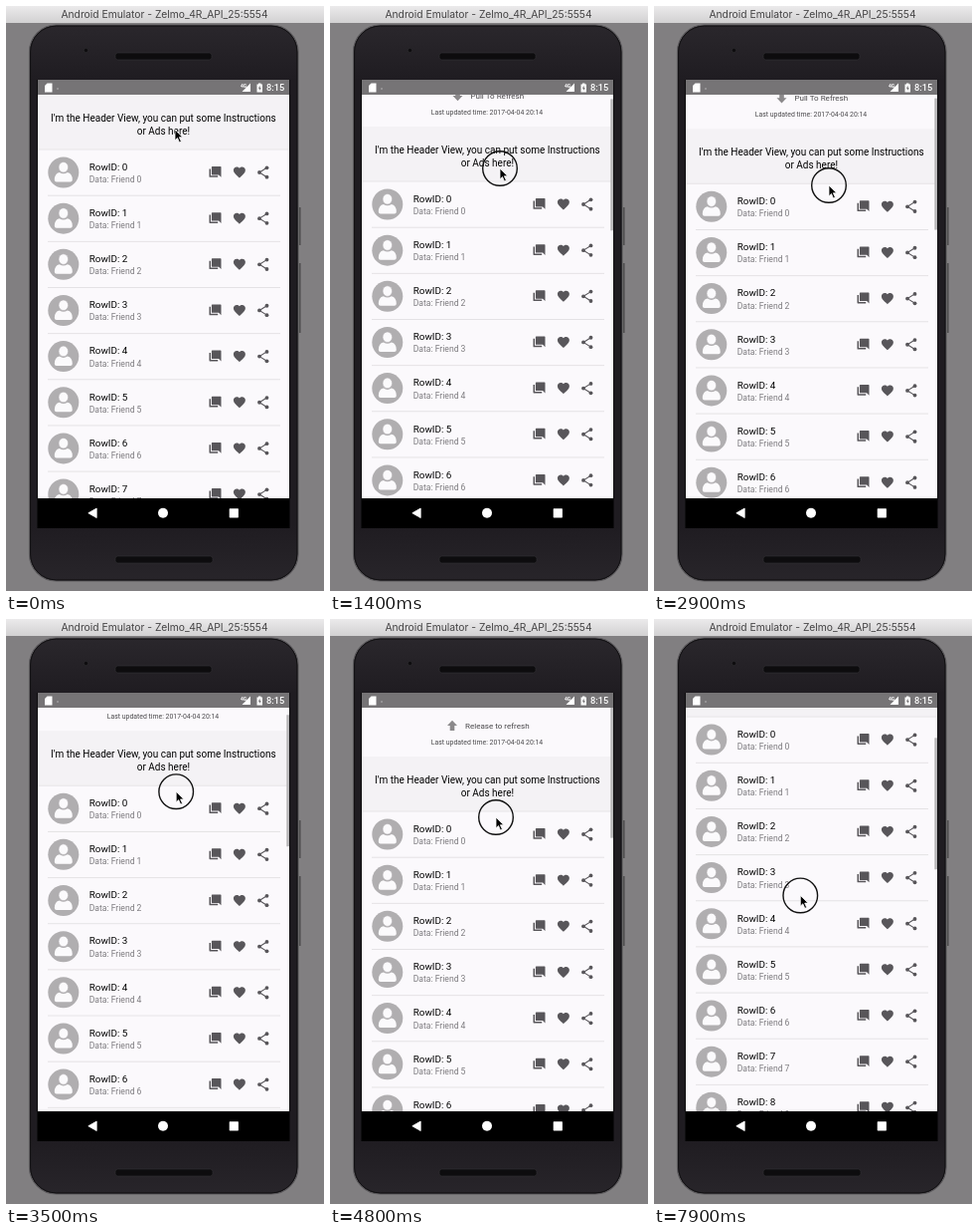
An HTML page that plays this animation: 320x587 px, repeating every 8000 ms.

```html
<!DOCTYPE html>
<html lang="en">
<head>
<meta charset="utf-8">
<title>Pull to refresh</title>
<style>
html, body { margin: 0; width: 100%; height: 100%; overflow: hidden; background: #817f81; }
svg { display: block; width: 320px; height: 587px; font-family: Roboto, "Open Sans", sans-serif; }
.bar { font-family: Inter, "Open Sans", sans-serif; }
</style>
</head>
<body>
<svg viewBox="0 0 320 587" xmlns="http://www.w3.org/2000/svg">
<defs>
  <linearGradient id="title" x2="0" y2="1">
    <stop stop-color="#ebeaeb"/><stop offset="1" stop-color="#d2d1d2"/>
  </linearGradient>
  <linearGradient id="body" x2="0" y2="1">
    <stop stop-color="#2a272c"/><stop offset=".1" stop-color="#1f1c21"/>
    <stop offset=".9" stop-color="#1f1c21"/><stop offset="1" stop-color="#28252a"/>
  </linearGradient>
  <clipPath id="view"><rect x="32" y="89" width="253" height="405"/></clipPath>
  <g id="icons" fill="#58565a">
    <path transform="translate(203.3 159.8) scale(.6)" d="M7 2h14q1 0 1 1v17l-4-4H7q-1 0-1-1V3q0-1 1-1zM2 6h2.500v11.500h12V20H3q-1 0-1-1z"/>
    <path transform="translate(227.7 159.7) scale(.6)" d="M12 21.4l-1.5-1.4C5.4 15.4 2 12.3 2 8.5 2 5.4 4.4 3 7.5 3c1.7 0 3.4.8 4.5 2.1C13.1 3.8 14.8 3 16.5 3 19.6 3 22 5.4 22 8.5c0 3.8-3.4 6.9-8.5 11.5z"/>
    <path d="M262.500 162.300l-7.500 4.700 7.500 4.700" fill="none" stroke="#58565a" stroke-width="1.1"/>
    <circle cx="262.500" cy="162.300" r="1.9"/><circle cx="255" cy="167" r="1.9"/><circle cx="262.500" cy="171.700" r="1.9"/>
  </g>
  <g id="avatar">
    <circle cx="57.8" cy="167" r="15.5" fill="#b0aeb0"/>
    <path d="M48.800 174.500q0-6.500 5-7.500 4 2.600 8 0 5 1 5 7.500 0 2-2 2H50.800q-2 0-2-2z" fill="#fbfafc"/>
    <ellipse cx="57.8" cy="161.800" rx="4.800" ry="5.300" fill="#fbfafc" stroke="#b0aeb0" stroke-width=".6"/>
  </g>
</defs>

<rect width="320" height="587" fill="#817f81"/>
<rect width="320" height="17" fill="url(#title)"/>
<text class="bar" x="159.500" y="12" font-size="10.300" text-anchor="middle" fill="#454445">Android Emulator - Zelmo_4R_API_25:5554</text>

<!-- phone -->
<path d="M295.800 202v38M295.800 258v70" stroke="#4a494b" stroke-width="1.400"/>
<rect x="23.500" y="19" width="270.500" height="558" rx="27" fill="url(#body)" stroke="#5c5a5d" stroke-width="1.200"/>
<rect x="24.600" y="20.100" width="268.300" height="555.800" rx="26" fill="none" stroke="#111012"/>
<g fill="#0d0c0e" stroke="#353337" stroke-width=".6">
  <rect x="110" y="47" width="97" height="7" rx="2.500"/>
  <rect x="110" y="552" width="98" height="7" rx="2.500"/>
  <circle cx="80.500" cy="44.500" r="2.200"/>
</g>
<rect x="31.500" y="74" width="254" height="450" fill="#000"/>
<rect x="32" y="74" width="253" height="15" fill="#767476"/>

<!-- status bar -->
<g fill="#fff">
  <path d="M41.500 77.500h5v9h-7.500v-6.500z"/>
  <circle cx="52" cy="83" r=".8" opacity=".5"/>
  <text x="236" y="82" font-size="5" font-weight="700">4G</text>
  <path d="M246 77.500v8.500h-8.500z"/>
  <path d="M254 77.500h2.500v1h1.500v8h-5.500v-8H254z"/>
  <path d="M255.600 79.800l-1.800 3h1.200v2.200l1.800-3h-1.200z" fill="#767476"/>
  <text x="262" y="85.300" font-size="9.200" font-weight="500">8:15</text>
</g>

<g clip-path="url(#view)">
  <rect x="32" y="89" width="253" height="405" fill="#fbf9fc"/>
  <g id="list">
    <path id="arrow" d="M-2.300-5h4.600V0H5L0 5.200-5 0h2.700z" fill="#8b898b"/>
    <text id="hint" x="168.300" y="61" font-size="8.050" text-anchor="middle" fill="#4a494b"></text>
    <text x="158" y="76.800" font-size="6.900" text-anchor="middle" fill="#4a494b">Last updated time: 2017-04-04 20:14</text>
    <rect x="32" y="89" width="253" height="55" fill="#f4f2f5"/>
    <path d="M32 144h253" stroke="#e2e0e3" stroke-width=".8"/>
    <g font-size="10" text-anchor="middle" fill="#000">
      <text x="158.400" y="116">I'm the Header View, you can put some Instructions</text>
      <text x="158.400" y="129">or Ads here!</text>
    </g>
    <g id="rows"></g>
  </g>
  <rect id="scroll" x="282.300" width="2.700" height="132" fill="#b9b8ba"/>
</g>

<!-- navigation -->
<g fill="#fff">
  <path d="M82.800 508.800l8.400-4.800v9.600z" stroke="#fff" stroke-width=".8" stroke-linejoin="round"/>
  <circle cx="158" cy="508.800" r="5"/>
  <rect x="224.700" y="504.200" width="9.200" height="9.200" rx=".6"/>
</g>

<g id="cursor">
  <circle id="ring" r="17.300" fill="none" stroke="#111" stroke-width="1.400"/>
  <path d="M0 0v10.800l2.500-2.400 2 4.500 1.900-.8-2-4.400h3.500z" fill="#000" stroke="#fff" stroke-width=".8"/>
</g>
</svg>
<script>
const $ = id => document.getElementById(id);
const LOOP = 8000, PITCH = 46.15, REFRESH = 46;

// Each key: time, value
const pull = [[0, 0], [400, 0], [1400, 32], [2900, 34.3], [4100, 12.2], [4800, 49],
  [5000, 49], [5250, REFRESH], [6650, REFRESH], [7200, 6], [7400, 0], [7500, 0], [7900, -45.8], [8000, -54]];
const mouseX = [[0, 170], [400, 170], [1400, 171], [2900, 176], [4100, 166.4], [4800, 167],
  [5200, 167], [6800, 157], [7400, 157], [7900, 147.3], [8000, 146]];
const mouseY = [[0, 124], [400, 124], [1400, 163], [2900, 180], [4100, 166.4], [4800, 199],
  [5200, 199], [6800, 325], [7400, 325], [7900, 277.5], [8000, 270]];

// Smooth curve through the keys that never overshoots
function track(keys, t) {
  const slope = i => keys[i + 1] && keys[i]
    ? (keys[i + 1][1] - keys[i][1]) / (keys[i + 1][0] - keys[i][0]) : 0;
  const tangent = i => {
    const a = slope(i - 1), b = slope(i);
    return a * b > 0 ? 2 * a * b / (a + b) : 0;
  };
  let i = 0;
  while (i < keys.length - 2 && t >= keys[i + 1][0]) i++;
  const [t0, v0] = keys[i], [t1, v1] = keys[i + 1];
  const d = t1 - t0, u = (t - t0) / d, w = 1 - u;
  return v0 * w * w * (1 + 2 * u) + v1 * u * u * (3 - 2 * u)
    + d * u * w * (tangent(i) * w - tangent(i + 1) * u);
}

const ramp = (t, start, length) => Math.min(1, Math.max(0, (t - start) / length));
const move = (id, x, y, extra = "") => $(id).setAttribute("transform", `translate(${x} ${y})${extra}`);

$("rows").innerHTML = Array.from({ length: 10 }, (_, i) => `
  <g transform="translate(0 ${i * PITCH})">
    <use href="#avatar"/><use href="#icons"/>
    <text x="83.700" y="164.800" font-size="9.900" fill="#000">RowID: ${i}</text>
    <text x="83.700" y="177" font-size="8.600" fill="#7d7b7f">Data: Friend ${i}</text>
    <path d="M42 190.200h234" stroke="#e2e0e3" stroke-width=".9"/>
  </g>`).join("");

function draw(t) {
  const y = track(pull, t);
  const release = t > 4200 && y >= REFRESH - 0.01;
  const turn = 180 * (ramp(t, 4600, 120) - ramp(t, 6650, 180));
  const pressed = t >= 400 && t < 5000 || t >= 7450;
  move("list", 0, y);
  $("hint").textContent = release ? "Release to refresh" : "Pull To Refresh";
  move("arrow", release ? 123 : 128.5, 58, ` rotate(${turn})`);
  $("scroll").setAttribute("y", 104 - y / 3);
  $("scroll").setAttribute("opacity", ramp(t, 400, 1) - ramp(t, 5900, 250) + ramp(t, 6650, 1));
  move("cursor", track(mouseX, t), track(mouseY, t));
  $("ring").setAttribute("visibility", pressed ? "visible" : "hidden");
}

const start = performance.now();
function frame() {
  draw((performance.now() - start) % LOOP);
  requestAnimationFrame(frame);
}
frame();
</script>
</body>
</html>
```
